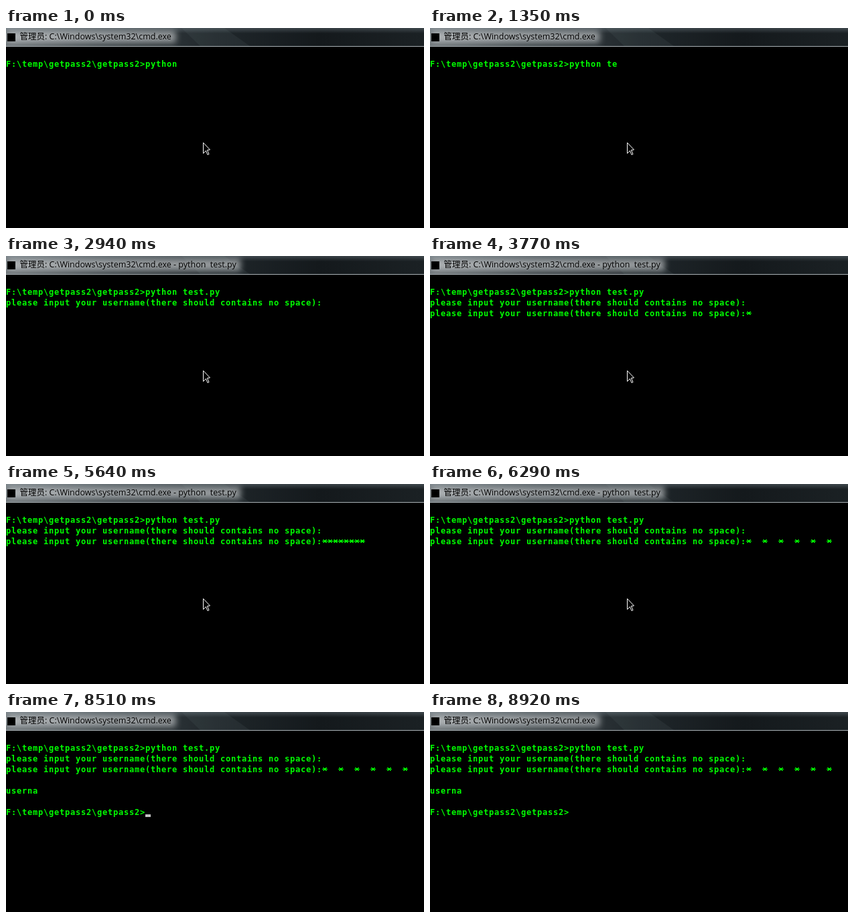
An HTML page with a canvas that plays this animation: 624x299 px, repeating every 9020 ms.

```html
<!DOCTYPE html>
<html lang="zh-CN">
<head>
<meta charset="utf-8">
<title>Console input</title>
<style>
  html, body { margin: 0; width: 100%; height: 100%; overflow: hidden; background: #000; }
  canvas { display: block; }
</style>
</head>
<body>
<canvas id="stage" width="624" height="299"></canvas>
<script>
const ctx = document.getElementById('stage').getContext('2d');
const LOOP = 9020, WIDTH = 624, HEIGHT = 299, BAR = 27;
const CELL = 8, LINE = 16, GREEN = '#00ff00';
const PROMPT = 'F:\\temp\\getpass2\\getpass2>';
const QUESTION = 'please input your username(there should contains no space):';
const TITLE = '管理员: C:\\Windows\\system32\\cmd.exe';

const between = (t, from, to) => t >= from && t < to;

// Number of keys pressed so far in an evenly typed burst.
const burst = (t, start, gap, max) =>
  Math.max(0, Math.min(max, Math.floor((t - start) / gap) + 1));

function rect(color, x, y, w, h) {
  ctx.fillStyle = color;
  ctx.fillRect(x, y, w, h);
}

function gradient(x, y, ...colors) {
  const fill = ctx.createLinearGradient(0, 0, x, y);
  colors.forEach((color, i) => fill.addColorStop(i / (colors.length - 1), color));
  return fill;
}

function polygon(color, ...points) {
  ctx.fillStyle = color;
  ctx.beginPath();
  points.forEach(([x, y]) => ctx.lineTo(x, y));
  ctx.closePath();
  ctx.fill();
}

function drawTitle(text) {
  rect(gradient(WIDTH, 0, '#6c7377', '#3a4246', '#20272b', '#14191c', '#1b2124'), 0, 0, WIDTH, BAR);
  rect(gradient(0, 8, 'rgba(150,165,175,.3)', 'rgba(150,165,175,0)'), 0, 0, WIDTH, 8);
  polygon('rgba(120,135,142,.1)', [262, 0], [326, 0], [364, BAR], [290, BAR]);
  rect('#a8b0b4', 0, BAR, WIDTH, 1);

  ctx.font = '12.5px "Open Sans", "Noto Sans CJK SC", "Noto Sans CJK", sans-serif';
  ctx.textAlign = 'left';
  const width = ctx.measureText(text).width;
  ctx.save();
  ctx.beginPath();
  ctx.rect(0, 0, WIDTH, BAR);
  ctx.clip();
  ctx.filter = 'blur(5px)';
  rect('rgba(215,218,220,.62)', 2, 4, width + 25, 18);
  ctx.restore();

  rect('#000', 2, 8, 12, 12);
  ctx.fillStyle = '#000';
  ctx.fillText(text, 20.5, 17);
}

function drawStar(x, y) {
  rect(GREEN, x, y + 2, 8, 1);
  rect(GREEN, x + 2, y + 1, 4, 3);
  for (const dx of [1, 5])
    for (const dy of [0, 4]) rect(GREEN, x + dx, y + dy, 2, 1);
}

function drawLine(text, row) {
  const y = 58 + row * LINE;
  ctx.font = 'bold 12px "DejaVu Sans Mono", "Liberation Mono", monospace';
  ctx.textAlign = 'center';
  [...text].forEach((char, i) => {
    if (char === '*') return drawStar(i * CELL, y - 7);
    ctx.fillStyle = GREEN;
    ctx.fillText(char, i * CELL + 3.5, y);
  });
}

function starText(t) {
  if (t >= 6290) return '*  '.repeat(6);
  if (t >= 6040) return '* '.repeat(7);
  return '*'.repeat(burst(t, 3770, 290, 4) + burst(t, 5250, 130, 4));
}

function consoleLines(t) {
  const typed = burst(t, 400, 1, 1) + burst(t, 1110, 240, 7);
  const lines = [PROMPT + 'python' + ' test.py'.slice(0, typed)];
  if (t >= 2940) lines.push(QUESTION);
  if (t >= 3770) lines.push(QUESTION + starText(t));
  if (t >= 6890) lines.push('', 'userna', '', PROMPT);
  return lines;
}

function caretLit(t) {
  return between(t, 150, 400) || between(t, 710, 1230) || between(t, 2700, 2820)
    || between(t, 7440, 8920) && (t - 7440) % 1070 < 520;
}

function drawPointer(x, y) {
  ctx.save();
  ctx.translate(x + .5, y + .5);
  polygon('#000', [0, 0], [0, 16], [4, 12], [6.5, 18], [8.5, 17], [6, 11], [10, 10.5]);
  ctx.strokeStyle = '#fff';
  ctx.lineJoin = 'round';
  ctx.stroke();
  ctx.restore();
}

function draw(t) {
  rect('#000', 0, 0, WIDTH, HEIGHT);
  drawTitle(TITLE + (between(t, 2820, 6890) ? ' - python  test.py' : ''));

  const lines = consoleLines(t);
  lines.forEach(drawLine);
  if (caretLit(t)) {
    const row = lines.length - 1;
    rect('#c0c0c0', lines[row].length * CELL, 57 + row * LINE, CELL, 4);
  }

  if (t < 8080) drawPointer(294, 171);
  else if (t < 8230) drawPointer(330, 196);
}

const start = performance.now();
function tick() {
  draw((performance.now() - start) % LOOP);
  requestAnimationFrame(tick);
}
tick();
</script>
</body>
</html>
```
